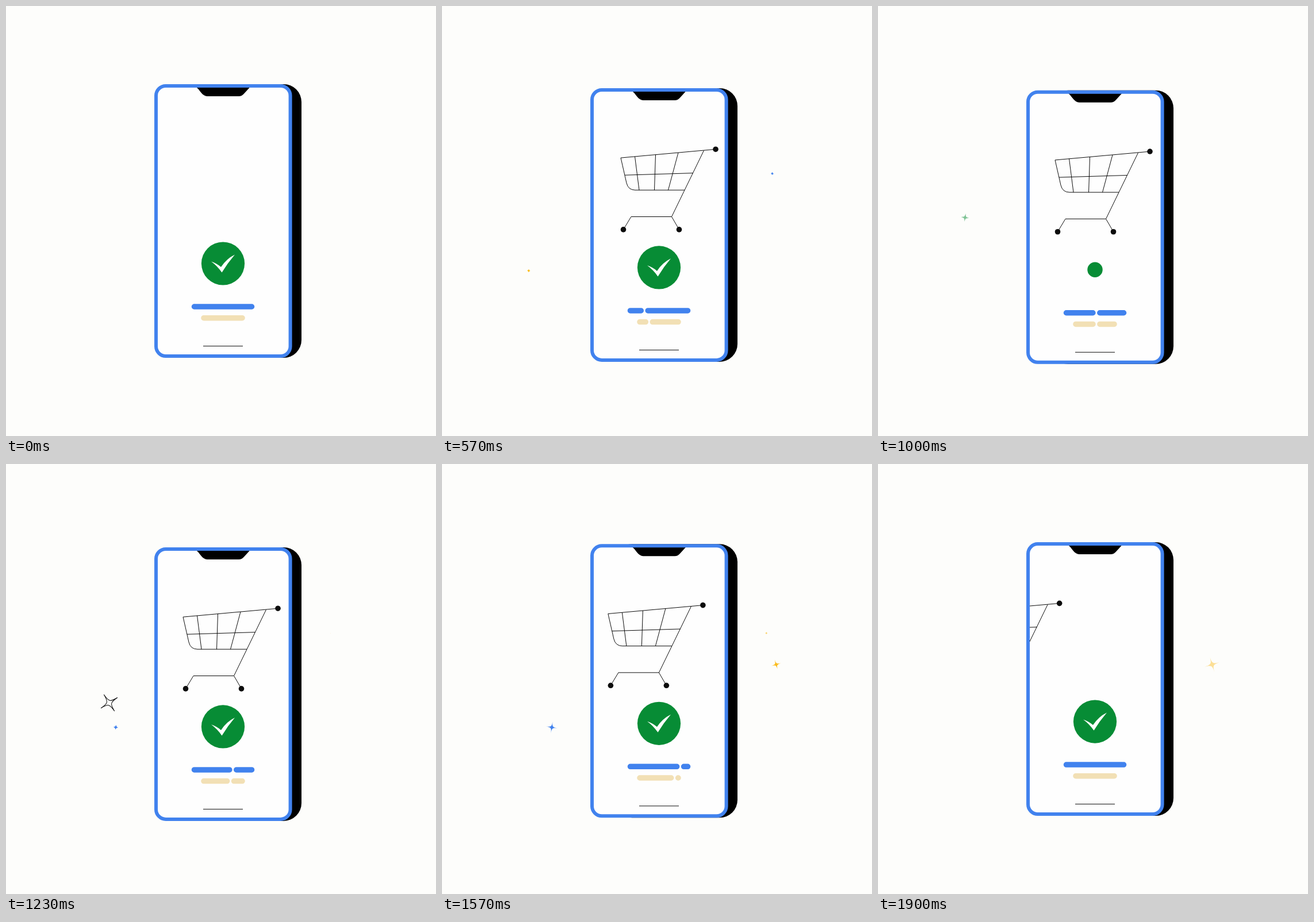
Animation, 748 px wide and 748 px high, one loop 1.93 s. Source, as an HTML page with a canvas:

```html
<!DOCTYPE html>
<html lang="en">
<head>
<meta charset="utf-8">
<title>Checkout complete</title>
<style>
html, body { margin: 0; width: 100%; height: 100%; overflow: hidden; background: #fdfdfb; }
canvas { display: block; width: 748px; height: 748px; }
</style>
</head>
<body>
<canvas id="stage" width="748" height="748"></canvas>
<script>
const ctx = document.getElementById('stage').getContext('2d');
const LOOP = 1930, TAU = Math.PI * 2;
const BLUE = '#4182ee', GREEN = '#078c35', SAND = '#f2e0b5', YELLOW = '#fbbc1c', INK = '#0c0c0c';

const clamp = v => Math.min(1, Math.max(0, v));
const span = (t, a, b) => clamp((t - a) / (b - a));
const smooth = v => v * v * (3 - 2 * v);
const easeOut = v => 1 - (1 - v) ** 3;

const star = (x, y, color, born, life, size, tilt = 0.15) => ({ x, y, color, born, life, size, tilt });
const stars = [
  star(170, 352.5, BLUE, 100, 340, 4),
  star(574.5, 291.5, BLUE, 270, 480, 2.7),
  star(150.8, 460.5, YELLOW, 380, 465, 3.4),
  star(550, 276.5, BLUE, 700, 200, 1.7),
  star(151.5, 368, GREEN, 735, 320, 7),
  star(179.5, 415.5, null, 1030, 420, 20, 1),
  star(191, 458, BLUE, 1130, 700, 11),
  star(564.3, 294.3, YELLOW, 1210, 460, 2),
  star(581.3, 348.8, YELLOW, 1400, 590, 14, -0.3)
];

function bob(t) {
  return 5.4 * (1 - Math.cos(TAU * t / LOOP));
}

// glides in from the right, rests, leaves to the left
function cartShift(t) {
  return 201 * (1 - span(t, 0, 756)) ** 3 - 180 * span(t, 1246, LOOP) ** 3;
}

function line(...pts) {
  ctx.moveTo(pts[0], pts[1]);
  for (let i = 2; i < pts.length; i += 2) ctx.lineTo(pts[i], pts[i + 1]);
}

function disc(x, y, r) {
  ctx.beginPath();
  ctx.arc(x, y, r, 0, TAU);
  ctx.fill();
}

function box(x, y, w, h, r) {
  ctx.beginPath();
  ctx.roundRect(x, y, w, h, r);
}

function drawStar(s, t) {
  const p = (t - s.born) / s.life;
  if (p <= 0 || p >= 1) return;
  const r = s.size * easeOut(p);
  const waist = Math.max(0.02, 0.5 - 0.05 * r) * r;
  ctx.save();
  ctx.globalAlpha = Math.min(1, 3 * (1 - p));
  ctx.translate(s.x, s.y);
  ctx.rotate(s.tilt);
  ctx.beginPath();
  ctx.moveTo(r, 0);
  for (let i = 0; i < 4; i++) {
    const arm = Math.max(waist, 0.12 * r);
    ctx.bezierCurveTo(arm, waist, waist, arm, 0, r);
    ctx.rotate(TAU / 4);
  }
  ctx.closePath();
  if (s.color) {
    ctx.fillStyle = s.color;
    ctx.fill();
  } else {
    ctx.strokeStyle = INK;
    ctx.lineWidth = 1;
    ctx.lineJoin = 'bevel';
    ctx.stroke();
  }
  ctx.restore();
}

function drawCart(shift) {
  ctx.save();
  box(263, 141, 229, 466, 15);
  ctx.clip();
  ctx.translate(shift, 0);
  ctx.strokeStyle = ctx.fillStyle = INK;
  ctx.lineWidth = 1;
  ctx.beginPath();
  line(473, 242.3, 308, 257.2, 318, 301);
  ctx.quadraticCurveTo(321, 313.3, 333, 313.3);
  ctx.lineTo(419, 313.3);
  line(452.5, 244.5, 396.5, 359.6, 409.5, 382);
  line(396.5, 359.6, 326, 359.6, 312.5, 382);
  line(315, 287.3, 434, 283.7);
  line(332.5, 255, 340, 313.3);
  line(368.5, 251.8, 366.5, 313.3);
  line(408, 248.2, 390.5, 313.3);
  ctx.stroke();
  disc(473, 242.3, 4.8);
  disc(312.5, 382, 4.8);
  disc(409.5, 382, 4.8);
  ctx.restore();
}

function drawBadge(t) {
  const size = 1 - smooth(span(t, 718, 918)) + smooth(span(t, 920, 1120));
  if (size <= 0) return;
  ctx.save();
  ctx.translate(377.5, 448);
  ctx.scale(size, size);
  ctx.fillStyle = GREEN;
  disc(0, 0, 37.6);
  // the tick wipes away and returns from left to right
  const from = t < 920 ? span(t, 670, 850) : 0;
  const to = t < 920 ? 1 : smooth(span(t, 980, 1180));
  ctx.beginPath();
  ctx.rect(-21 + 42 * from, -20, 42 * (to - from), 40);
  ctx.clip();
  ctx.beginPath();
  ctx.moveTo(-20.5, -3.6);
  ctx.quadraticCurveTo(-11, -0.5, -3.5, 6);
  ctx.quadraticCurveTo(6, -8.5, 20.5, -15.6);
  ctx.quadraticCurveTo(8, -1, -2, 15.5);
  ctx.quadraticCurveTo(-10, 4, -20.5, -3.6);
  ctx.fillStyle = '#fff';
  ctx.fill();
  ctx.restore();
}

// two round-ended pieces with a travelling gap between them
function drawBar(x0, x1, y, color, p) {
  const cap = 4.75, gap = x0 + (x1 - x0) * p;
  const a = x0 + cap, b = x1 - cap;
  ctx.strokeStyle = color;
  ctx.lineWidth = cap * 2;
  ctx.lineCap = 'round';
  ctx.beginPath();
  line(a, y, Math.max(a + 0.01, Math.min(b, gap - 1.2 - cap)), y);
  line(Math.min(b - 0.01, Math.max(a, gap + 1.2 + cap)), y, b, y);
  ctx.stroke();
  ctx.lineCap = 'butt';
}

function drawPhone(t) {
  ctx.save();
  ctx.translate(0, bob(t));
  ctx.fillStyle = '#000';
  box(300, 136, 214, 476, 31);
  ctx.fill();
  ctx.fillStyle = '#fefefe';
  box(261, 139, 233.6, 470, 17);
  ctx.fill();

  drawCart(cartShift(t));
  drawBadge(t);

  const u = t / LOOP, p = u - 0.027 * Math.sin(TAU * u);
  drawBar(322.7, 432.3, 523, BLUE, p);
  drawBar(339.2, 415.8, 542.7, SAND, p + 0.02 * u);

  ctx.fillStyle = '#222';
  ctx.fillRect(343, 591, 69, 1.1);

  ctx.fillStyle = '#000';
  ctx.beginPath();
  ctx.moveTo(331, 141);
  ctx.quadraticCurveTo(334.5, 144, 338, 149);
  ctx.quadraticCurveTo(344, 157, 350, 157);
  ctx.lineTo(405, 157);
  ctx.quadraticCurveTo(410, 157, 414, 152.5);
  ctx.lineTo(424.5, 141);
  ctx.fill();

  ctx.strokeStyle = BLUE;
  ctx.lineWidth = 6;
  box(261, 139, 233.6, 470, 17);
  ctx.stroke();
  ctx.restore();
}

function draw(t) {
  ctx.fillStyle = '#fdfdfb';
  ctx.fillRect(0, 0, 748, 748);
  drawPhone(t);
  stars.forEach(s => drawStar(s, t));
}

let start = null;
function tick(now) {
  if (start === null) start = now;
  draw((now - start) % LOOP);
  requestAnimationFrame(tick);
}
draw(0);
requestAnimationFrame(tick);
</script>
</body>
</html>
```
